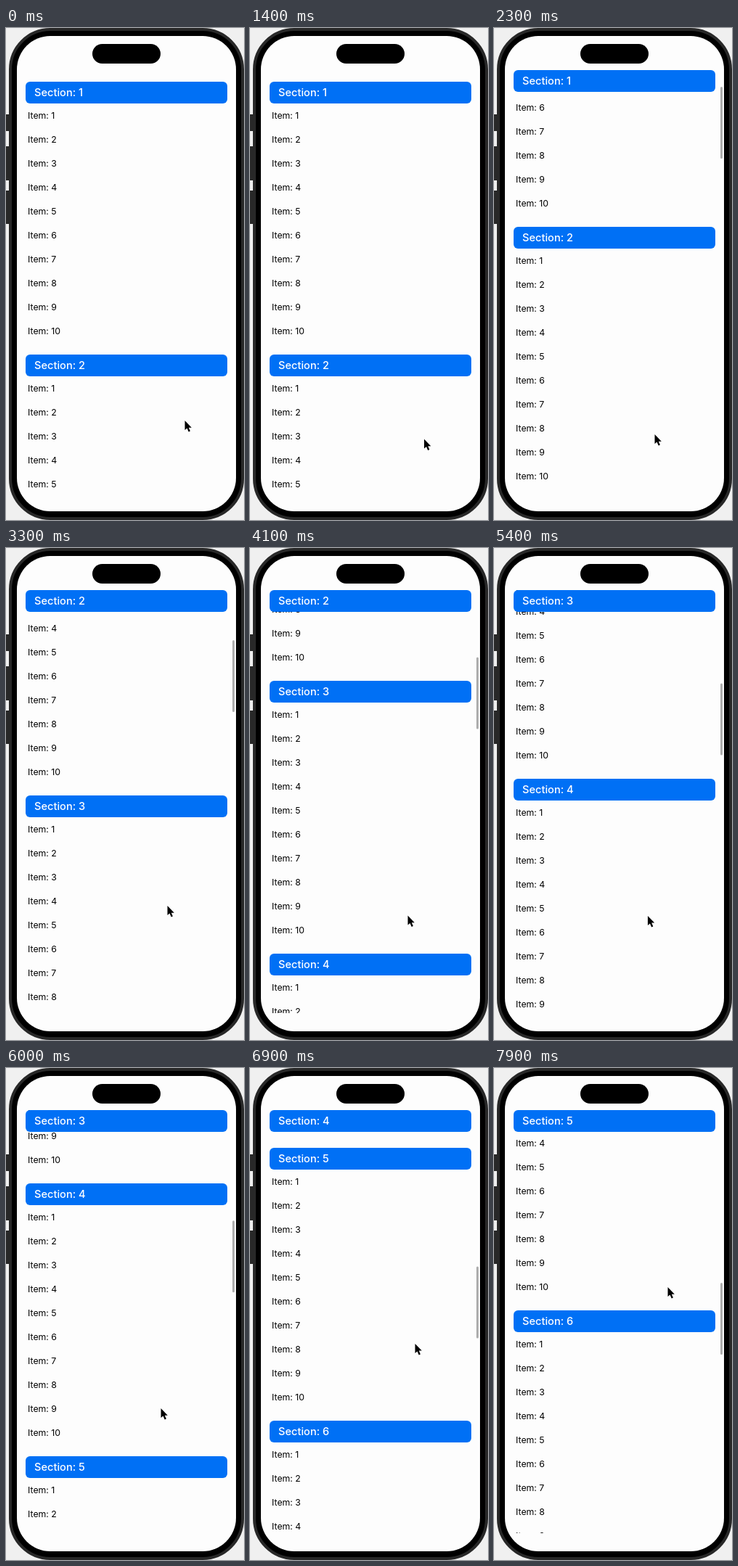
Animation, 328 px wide and 678 px high, one loop 8 s. Source, as an HTML page:

```html
<!DOCTYPE html>
<html lang="en">
<head>
<meta charset="utf-8">
<title>Pinned section headers</title>
<style>
  html, body { margin: 0; width: 100%; height: 100%; overflow: hidden; }
  body { position: relative; background: #f0f0f0; font-family: Inter, sans-serif; }
  body > * { position: absolute; box-sizing: border-box; }
  .key { left: 0; width: 5px; background: #282828; }
  #phone { left: 4px; top: 0; width: 324px; height: 678px; border-radius: 57px;
    background: #000; border: 4px solid #282828; }
  #screen { left: 15px; top: 11px; width: 302px; height: 655px; border-radius: 46px; background: #fdfdfd; }
  #island { left: 119px; top: 22px; width: 94px; height: 27px; border-radius: 14px; background: #000; }
  #list { left: 27px; top: 57.5px; width: 278px; height: 583px; overflow: hidden; }
  #list::before { content: ""; display: block; height: 16.5px; }
  section { height: 360px; margin-bottom: 16px; }
  h2 { position: sticky; top: 0; margin: 0; height: 30px; padding-left: 12px; border-radius: 6px;
    background: #0070f5; color: #fff; font: 500 14.6px/30px Inter, sans-serif; }
  p { margin: 0; height: 33px; padding-left: 3px; color: #000; font-size: 12.3px; line-height: 33px; }
  #bar { left: 312px; top: 0; width: 3px; height: 99px; border-radius: 2px; background: #adadad; }
  #cursor { left: 0; top: 0; overflow: visible; }
</style>
</head>
<body>
<div class="key" style="top:119px;height:23px"></div>
<div class="key" style="top:163px;height:47px"></div>
<div class="key" style="top:224px;height:46px"></div>
<div id="phone"></div>
<div id="screen"></div>
<div id="island"></div>
<div id="list"></div>
<div id="bar"></div>
<svg id="cursor" width="12" height="19">
  <path d="M0 .5V13.5L3 11L5.2 16L7.4 15L5.3 10.2H9.3Z" fill="#000" stroke="#fff" stroke-width="1.2" paint-order="stroke"/>
</svg>
<script>
const $ = id => document.getElementById(id);
const LOOP = 8000;

// time, scroll offset, cursor x, cursor y
const KEYS = [
  [0, 0, 246.5, 540.5],
  [1400, 0, 240, 566],
  [2300, 176.5, 221.5, 559.5],
  [3300, 485, 222.5, 492.5],
  [4900, 786, 212.5, 519.5],
  [6000, 1043, 213.5, 468.5],
  [6900, 1468.5, 227.5, 379.5],
  [7900, 1620, 239.5, 301.5],
  [8000, 1634, 240, 296]
];

const slope = (i, c) => KEYS[i] && KEYS[i + 1]
  ? (KEYS[i + 1][c] - KEYS[i][c]) / (KEYS[i + 1][0] - KEYS[i][0]) : 0;

// Flat where the direction turns, otherwise the mean of both neighbours
function tangent(i, c) {
  const a = slope(i - 1, c), b = slope(i, c);
  return a * b > 0 ? (a + b) / 2 : 0;
}

function at(t, c) {
  let i = 0;
  while (i < KEYS.length - 2 && t >= KEYS[i + 1][0]) i++;
  const a = KEYS[i], b = KEYS[i + 1], d = b[0] - a[0], u = (t - a[0]) / d, v = 1 - u;
  return v * v * (1 + 2 * u) * a[c] + u * u * (3 - 2 * u) * b[c]
    + d * u * v * (v * tangent(i, c) - u * tangent(i + 1, c));
}

const range = n => Array.from({ length: n }, (_, i) => i + 1);
const items = range(10).map(n => `<p>Item: ${n}</p>`).join('');
$('list').innerHTML = range(8).map(n => `<section><h2>Section: ${n}</h2>${items}</section>`).join('');

function draw(now) {
  const t = now % LOOP, y = at(t, 1);
  $('list').scrollTop = y;
  $('bar').style.transform = `translateY(${54.7 + y * 0.149}px)`;
  $('bar').style.opacity = Math.min(1, Math.max(0, (t - 1400) / 200));
  $('cursor').style.transform = `translate(${at(t, 2)}px, ${at(t, 3)}px)`;
  requestAnimationFrame(draw);
}
requestAnimationFrame(draw);
</script>
</body>
</html>
```
